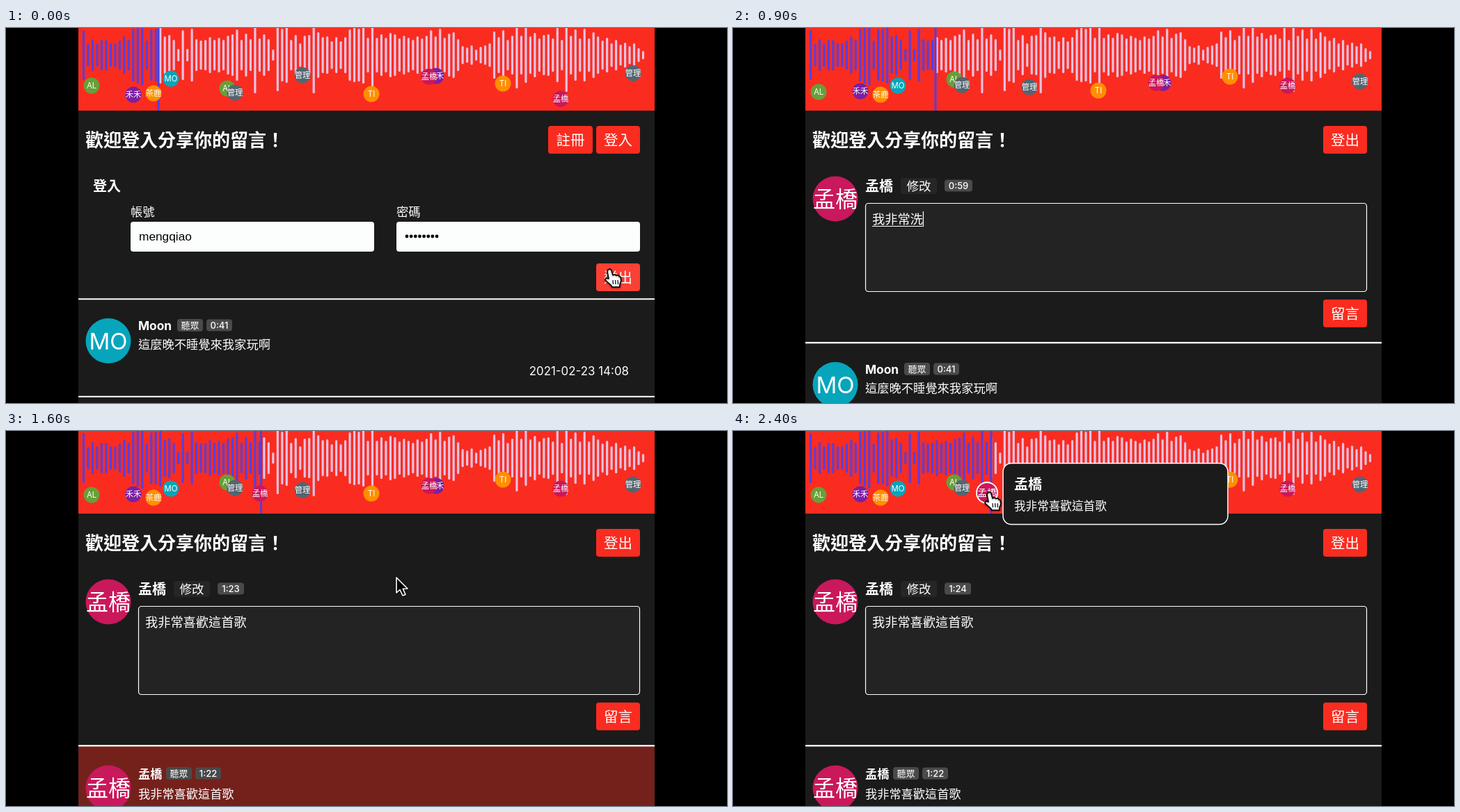
An HTML page with a canvas that plays this animation: 1036 px wide and 540 px high, repeating every 2500 ms.

```html
<!DOCTYPE html>
<html lang="zh-Hant">
<head>
<meta charset="utf-8">
<title>Audio comments</title>
<style>
html, body { margin: 0; width: 100%; height: 100%; overflow: hidden; background: #000; }
canvas { display: block; }
</style>
</head>
<body>
<canvas id="stage" width="1036" height="540"></canvas>
<script>
const ctx = document.getElementById('stage').getContext('2d');
const LOOP = 2500, STEP = 100;
const SANS = "Inter, 'Noto Sans CJK TC', 'Noto Sans CJK', sans-serif";
const MONO = "'Liberation Mono', 'Noto Sans CJK TC', 'Noto Sans CJK', monospace";
const RED = '#fa2c20', HOVER = '#fb4034', PAGE = '#1b1b1b', BADGE = '#4a4a4a';
const GREEN = '#689f38', PURPLE = '#7b1fa2', ORANGE = '#ff8f00',
      CYAN = '#06a5bb', SLATE = '#546570', PINK = '#c9185b';
const USER = '孟橋', COMMENT = '我非常喜歡這首歌';

// half heights of the waveform bars
const bars = [
  36, 16, 23, 17, 22, 22, 17, 17, 21, 27, 22, 38, 41, 44, 21, 37, 38, 41, 27, 29,
  22, 9, 36, 9, 38, 23, 21, 22, 26, 22, 25, 22, 28, 30, 37, 22, 31, 23, 55, 24,
  30, 23, 8, 52, 38, 40, 22, 29, 17, 28, 29, 55, 33, 26, 27, 20, 26, 20, 26, 37,
  39, 38, 41, 25, 46, 25, 30, 25, 32, 30, 24, 28, 25, 22, 27, 24, 28, 36, 27, 38,
  25, 31, 33, 23, 13, 11, 14, 8, 12, 14, 17, 34, 26, 36, 22, 28, 48, 28, 40, 27,
  32, 24, 29, 30, 24, 39, 22, 53, 28, 37, 24, 38, 24, 33, 27, 21, 25, 17, 22, 15,
  18, 13, 17, 10, 6
];

// label, colour, x, y before login, y after login
const markers = [
  ['AL', GREEN, 123, 83, 92], ['禾禾', PURPLE, 183, 96, 91],
  ['茶鹿', ORANGE, 212, 94, 96], ['MO', CYAN, 237, 73, 83],
  ['AL', GREEN, 318, 87, 74], ['管理', SLATE, 329, 93, 82],
  ['管理', SLATE, 426, 68, 85], ['TI', ORANGE, 525, 95, 90],
  ['禾禾', PURPLE, 618, 69, 79], [USER, PINK, 608, 70, 79],
  ['TI', ORANGE, 714, 80, 70], [USER, PINK, 797, 102, 83],
  ['管理', SLATE, 901, 65, 77]
];

// piecewise linear tracks: [step, value...]
const playhead = [[0, 219], [3, 219.6], [6, 233], [9, 291], [13, 363], [18, 369], [24, 371]];
const pointer = [[0, 867, 347], [1, 915, 342], [2, 970, 334], [3, 997, 330], [6, 995, 321], [7, 995, 321]];
const pointerBack = [[11, 900, 385], [12, 880, 398], [13, 868, 404], [14, 866, 403], [16, 560, 210],
  [17, 430, 110], [18, 388, 85], [20, 368, 86], [24, 368, 88]];
const rowGlow = { 6: 0.93, 13: 1, 14: 1, 15: 1, 16: 0.4 };

function at(track, s, i = 1) {
  for (let k = 1; k < track.length; k++) {
    const a = track[k - 1], b = track[k];
    if (s <= b[0]) return a[i] + (b[i] - a[i]) * Math.max(0, (s - a[0]) / (b[0] - a[0]));
  }
  return track[track.length - 1][i];
}

function rect(x, y, w, h, color) {
  ctx.fillStyle = color;
  ctx.fillRect(x, y, w, h);
}

function round(x, y, w, h, r, fill, stroke, line = 1) {
  ctx.beginPath();
  ctx.roundRect(x, y, w, h, r);
  ctx.fillStyle = fill;
  ctx.fill();
  if (stroke) {
    ctx.strokeStyle = stroke;
    ctx.lineWidth = line;
    ctx.stroke();
  }
}

function disc(x, y, r, color) {
  ctx.beginPath();
  ctx.arc(x, y, r, 0, Math.PI * 2);
  ctx.fillStyle = color;
  ctx.fill();
}

// cy is the middle of the glyphs
function text(str, x, cy, size, { weight = 400, color = '#fff', align = 'left', font = SANS } = {}) {
  ctx.font = `${weight} ${size}px ${font}`;
  ctx.textAlign = align;
  ctx.fillStyle = color;
  ctx.fillText(str, x, cy + size * 0.37);
}

function button(label, x, y, hover) {
  const w = label === '註冊' ? 64 : 63;
  round(x, y, w, 40, 4, hover ? HOVER : RED);
  text(label, x + w / 2, y + 20, 20.5, { align: 'center' });
}

function badge(label, x, cy, w, h = 17) {
  round(x, cy - h / 2, w, h, 4, BADGE);
  text(label, x + w / 2, cy, 13, { weight: 500, align: 'center' });
}

function avatar(label, x, y, r, color, size) {
  disc(x, y, r, color);
  text(label, x, y, size, { align: 'center' });
}

function drawBars(color, from, to) {
  ctx.save();
  ctx.beginPath();
  ctx.rect(from, 0, to - from, 119);
  ctx.clip();
  ctx.strokeStyle = color;
  ctx.lineWidth = 3.2;
  ctx.lineCap = 'round';
  ctx.beginPath();
  bars.forEach((h, i) => {
    const x = 111.5 + 6.484 * i;
    ctx.moveTo(x, 40.5 - h);
    ctx.lineTo(x, 37.5 + h);
  });
  ctx.stroke();
  ctx.restore();
}

function wave(s, logged, posted) {
  const px = at(playhead, s);
  rect(104, 0, 828, 119, RED);
  drawBars('#e4c2e2', px, 932);
  drawBars('#5a3fd9', 104, px);
  rect(px - 1.5, 0, 3, 119, '#4f40e0');
  for (const [label, color, x, before, after] of markers)
    avatar(label, x, logged ? after : before, 11.5, color, 11.3);
  if (posted) {
    if (s >= 20) {
      disc(365, 89, 16, '#fff');
      avatar(USER, 365, 89, 14, PINK, 14);
    } else avatar(USER, 365, 90, 11.5, PINK, 11.3);
  }
}

function loginForm(s) {
  button('註冊', 779, 141);
  button('登入', 848, 141);
  text('登入', 125, 228, 20, { weight: 700 });
  text('帳號', 179, 265, 17.3);
  text('密碼', 561, 265, 17.3);
  round(179, 279, 350, 43, 4, '#fcfefd');
  round(561, 279, 350, 43, 4, '#fcfefd');
  text('mengqiao', 191, 300, 17.3, { color: '#000', font: "'Liberation Sans', sans-serif" });
  for (let i = 0; i < 8; i++) disc(576 + 6.15 * i, 300, 2.4, '#000');
  button('送出', 848, 339, s === 0);
}

function clock(s) {
  if (s <= 6) return '0:41';
  if (s >= 18) return '1:24';
  const sec = Math.floor(at([[6, 41], [9, 59], [13, 82], [18, 84]], s));
  return Math.floor(sec / 60) + ':' + String(sec % 60).padStart(2, '0');
}

function typed(s) {
  if (s < 8) return '';
  if (s === 8) return '我非';
  if (s === 9) return '我非常洗';
  return COMMENT.slice(0, s === 10 ? 5 : s === 11 ? 7 : 8);
}

function commentForm(s) {
  button('登出', 848, 141);
  avatar(USER, 147, 246, 32.5, PINK, 32);
  text(USER, 190, 228, 20, { weight: 700 });
  round(241, 216, 52, 23, 4, '#262626');
  text('修改', 267, 228, 17.5, { align: 'center' });
  badge(clock(s), 304, 227, s > 6 && s < 12 ? 40 : 38);
  round(190.5, 252.5, 720, 127, 4, '#232323', '#fff', 1.2);
  const str = typed(s), size = 18.2;
  if (str) text(str, 200, 275, size);
  else text('留下評論分享...', 200, 275, size, { color: '#757575', font: MONO });
  if (s >= 8 && s <= 11) {
    const w = str.length * size;
    rect(200, 285, w, 1, '#fff');
    rect(200 + w, 264, 1.2, 22, '#fff');
  }
  button('留言', 848, 391, s === 13 || s === 14);
}

function oldRow(top, dy) {
  const y = top + dy;
  avatar('MO', 147, y + 60, 32.5, CYAN, 33);
  text('Moon', 190, y + 38, 17.3, { weight: 700 });
  badge('聽眾', 246, y + 37.5, 37, 18);
  badge('0:41', 288, y + 37.5, 37);
  text('這麼晚不睡覺來我家玩啊', 190, y + 65.5, 17.27);
}

function newRow() {
  avatar(USER, 147, 514, 32.5, PINK, 32);
  text(USER, 190, 493.5, 17.2, { weight: 700 });
  badge('聽眾', 230, 493, 37, 18);
  badge('1:22', 272, 493, 37);
  text(COMMENT, 190, 523, 17.2);
}

function tooltip() {
  round(388, 46.5, 323, 88, 12, PAGE, '#fff', 1.5);
  text(USER, 404, 77, 20, { weight: 700 });
  text(COMMENT, 404, 108, 16.6);
}

function shape(points, x, y) {
  ctx.save();
  ctx.translate(x, y);
  ctx.shadowColor = 'rgba(0,0,0,.4)';
  ctx.shadowBlur = 3;
  ctx.shadowOffsetY = 1;
  ctx.beginPath();
  points.forEach(([a, b]) => ctx.lineTo(a, b));
  ctx.closePath();
  ctx.lineJoin = 'round';
}

function arrow(x, y) {
  shape([[1, 1], [1, 23], [6, 18.5], [10, 27], [14, 25.5], [10.3, 17.2], [17, 17]], x, y);
  ctx.fillStyle = '#000';
  ctx.fill();
  ctx.strokeStyle = '#fff';
  ctx.lineWidth = 1.6;
  ctx.stroke();
  ctx.restore();
}

function hand(x, y) {
  shape([[-2, 1], [1, 0], [3, 2], [5, 9], [8, 8], [10, 9.5], [13, 9], [14, 11], [16, 11.5],
    [17, 17], [15, 22], [15, 26], [4, 26], [2, 23], [-6, 16], [-5, 13], [-1, 14], [-3, 4]], x, y);
  ctx.fillStyle = '#fff';
  ctx.strokeStyle = '#000';
  ctx.lineWidth = 1.6;
  ctx.fill();
  ctx.stroke();
  ctx.shadowColor = 'transparent';
  ctx.beginPath();
  for (const k of [5, 8.5, 12]) {
    ctx.moveTo(k, 16);
    ctx.lineTo(k + 0.5, 22);
  }
  ctx.lineWidth = 1.2;
  ctx.stroke();
  ctx.restore();
}

function cursor(s) {
  if (s > 6 && s < 12) return;
  const track = s <= 6 ? pointer : pointerBack;
  const over = s === 0 || s === 13 || s === 14 || s >= 20;
  (over ? hand : arrow)(at(track, s), at(track, s, 2));
}

function draw(s) {
  const logged = s >= 5, posted = s >= 13;
  rect(0, 0, 1036, 540, '#000');
  rect(104, 0, 828, 540, PAGE);
  wave(s, logged, posted);
  text('歡迎登入分享你的留言！', 114, 161, 26, { weight: 700 });
  if (logged) {
    commentForm(s);
    ctx.globalAlpha = rowGlow[s] || 0;
    rect(104, 454, 828, 86, RED);
    ctx.globalAlpha = 1;
    rect(104, 452, 828, 2.4, '#f4f4f4');
    if (posted) newRow();
    else oldRow(453, 0.5);
  } else {
    loginForm(s);
    rect(104, 389.3, 828, 2, '#fff');
    oldRow(390, 0.5);
    text('2021-02-23 14:08', 895, 493.5, 16.9, { align: 'right' });
    rect(104, 529.8, 828, 2, '#fff');
  }
  if (s >= 20) tooltip();
  cursor(s);
}

const start = performance.now();
function frame() {
  draw(Math.floor(((performance.now() - start) % LOOP) / STEP));
  requestAnimationFrame(frame);
}
frame();
</script>
</body>
</html>
```
